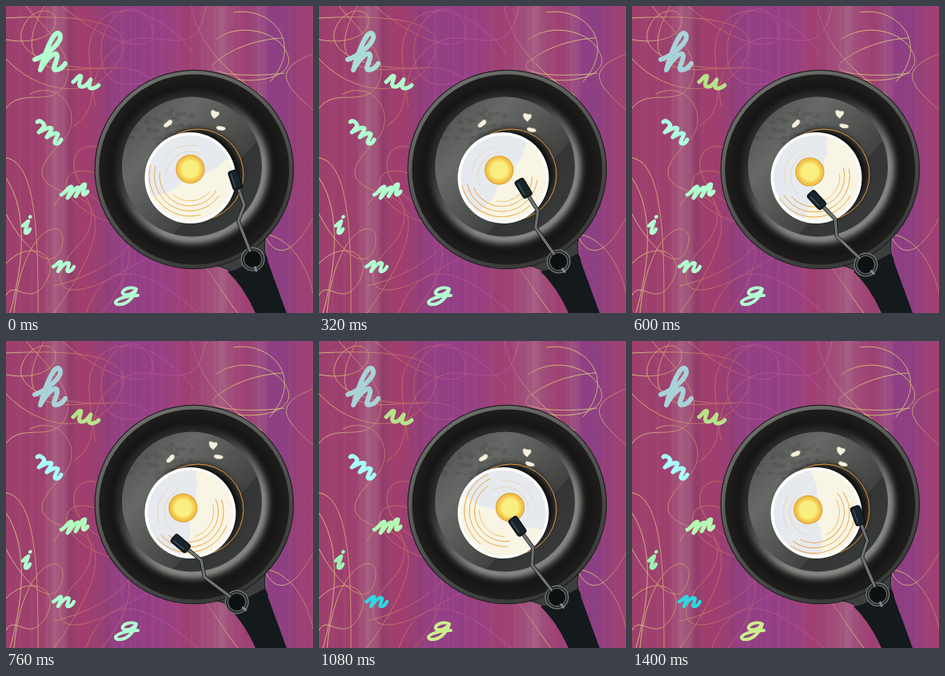
An HTML page that plays this animation: 384 by 384 pixels, repeating every 1.44 s.

```html
<!DOCTYPE html>
<html lang="en">
<head>
<meta charset="utf-8">
<title>Humming pan</title>
<style>
  html, body { margin: 0; height: 100%; overflow: hidden; background: #98407a; }
  svg { display: block; width: 100vw; height: 100vh; }
  filter { color-interpolation-filters: sRGB; }
  .line { fill: none; stroke-linecap: round; stroke-linejoin: round; }
</style>
</head>
<body>
<svg viewBox="0 0 384 384">
  <defs>
    <linearGradient id="wall">
      <stop offset="0" stop-color="#9f3f6d"/>
      <stop offset=".12" stop-color="#9e416f"/>
      <stop offset=".16" stop-color="#a65c80"/>
      <stop offset=".19" stop-color="#9f4f78"/>
      <stop offset=".21" stop-color="#933e6b"/>
      <stop offset=".25" stop-color="#a23e6d"/>
      <stop offset=".3" stop-color="#994074"/>
      <stop offset=".35" stop-color="#934081"/>
      <stop offset=".44" stop-color="#954087"/>
      <stop offset=".52" stop-color="#984082"/>
      <stop offset=".59" stop-color="#a04074"/>
      <stop offset=".65" stop-color="#a04a78"/>
      <stop offset=".7" stop-color="#a55c82"/>
      <stop offset=".74" stop-color="#a04a78"/>
      <stop offset=".78" stop-color="#9f4074"/>
      <stop offset=".83" stop-color="#9a4c80"/>
      <stop offset=".86" stop-color="#8f4085"/>
      <stop offset=".91" stop-color="#8e4083"/>
      <stop offset=".95" stop-color="#9a4078"/>
      <stop offset="1" stop-color="#a04072"/>
    </linearGradient>
    <linearGradient id="thread" gradientUnits="userSpaceOnUse" x2="384">
      <stop offset="0" stop-color="#e3e48a"/>
      <stop offset=".12" stop-color="#d9a370"/>
      <stop offset=".3" stop-color="#c96b63"/>
      <stop offset=".45" stop-color="#b850a0"/>
      <stop offset=".62" stop-color="#c257ac"/>
      <stop offset=".74" stop-color="#e4cf72"/>
      <stop offset=".88" stop-color="#e4e07c"/>
      <stop offset="1" stop-color="#c97868"/>
    </linearGradient>
    <linearGradient id="rim" x1=".25" y1="0" x2=".75" y2="1">
      <stop offset="0" stop-color="#70726e"/>
      <stop offset=".5" stop-color="#525451"/>
      <stop offset="1" stop-color="#343634"/>
    </linearGradient>
    <linearGradient id="floor" gradientUnits="userSpaceOnUse" x1="165" y1="140" x2="300" y2="262">
      <stop offset="0" stop-color="#555855"/>
      <stop offset=".22" stop-color="#666965"/>
      <stop offset=".4" stop-color="#595c59"/>
      <stop offset=".71" stop-color="#414341"/>
      <stop offset=".72" stop-color="#343635"/>
      <stop offset="1" stop-color="#383a39"/>
    </linearGradient>
    <linearGradient id="shine" x1=".2" y1=".1" x2=".8" y2=".9">
      <stop offset=".2" stop-color="#999" stop-opacity=".15"/>
      <stop offset=".75" stop-color="#aeb0ac"/>
    </linearGradient>
    <filter id="blur" x="-20%" y="-20%" width="140%" height="140%"><feGaussianBlur stdDeviation="4"/></filter>
    <clipPath id="floorClip"><circle cx="232.5" cy="201" r="87.5"/></clipPath>
    <clipPath id="eggClip"><circle cx="230.5" cy="215" r="53.5"/></clipPath>
  </defs>

  <rect width="384" height="384" fill="url(#wall)"/>
  <g id="stripes"/>
  <g class="line" stroke="url(#thread)" stroke-width=".9" opacity=".85">
    <path d="M0 42C30 48 60 40 62 20S30 0 20 30S60 80 130 78"/>
    <path d="M25 0C40 20 90 60 75 95S20 100 0 128"/>
    <path d="M48 0C30 30 20 70 60 78S160 60 190 100"/>
    <path d="M0 66C40 110 110 120 140 70S100 10 0 15"/>
    <path d="M0 190C40 195 40 300 40 384"/>
    <path d="M0 215C30 260 20 330 5 384"/>
    <path d="M0 260C20 300 60 340 70 300S20 270 10 384"/>
    <path d="M0 322C30 290 70 310 50 345S10 340 0 362"/>
    <path d="M30 110C70 90 100 140 70 170S30 220 80 235S120 300 60 384"/>
    <path d="M70 0C140 60 200 60 180 20S110 20 120 70S190 90 240 80"/>
    <path d="M112 125C100 90 130 40 170 40S240 60 250 0"/>
    <path d="M85 150C130 120 90 70 110 30S190 0 235 60"/>
    <path d="M232 0C240 50 280 85 320 112"/>
    <path d="M262 42C290 20 340 30 352 60S310 100 268 88"/>
    <path d="M285 8C330 0 375 45 330 95"/>
    <path d="M346 40C310 42 280 55 262 70S300 90 348 84"/>
    <path d="M384 130C350 100 330 80 384 60"/>
    <path d="M100 384C130 300 190 340 240 384"/>
    <path d="M60 250C90 200 130 260 90 300S60 384 150 330S240 320 290 384"/>
    <path d="M115 210C60 190 60 250 130 270S110 340 60 350"/>
    <path d="M125 180C80 160 70 210 110 240S180 310 120 384"/>
    <path d="M384 265C350 330 330 300 325 290S370 290 384 360"/>
  </g>
  <g id="letters" class="line"/>

  <path d="M258 324Q282 328 285 337L327 318Q321 306 325 288Z" fill="#3b3e3d" stroke="#191b1b"/>
  <path d="M277 332Q292 330 300 322L323 310Q327 312 328 321L351 384H312Q298 352 277 332Z" fill="#14191c"/>
  <circle cx="235.3" cy="204.500" r="124.2" fill="url(#rim)" stroke="#1d1f1e" stroke-width="1.2"/>
  <circle cx="235.3" cy="204.500" r="119" fill="#1f1e1d"/>
  <circle cx="235" cy="204" r="104" fill="none" stroke="#171615" stroke-width="14" filter="url(#blur)"/>
  <circle cx="233" cy="202" r="89" fill="none" stroke="url(#shine)" stroke-width="9" filter="url(#blur)"/>
  <circle cx="232.5" cy="201" r="87.5" fill="url(#floor)"/>
  <g id="grain" clip-path="url(#floorClip)" fill="#222" opacity=".13"/>

  <circle cx="238" cy="209" r="55" fill="#0b0c0b" filter="url(#blur)"/>
  <circle cx="240" cy="211" r="57" fill="none" stroke="#e9983a"/>
  <g id="butter" fill="#f5f0df" stroke="#d8cdb4" stroke-width=".6">
    <path d="M-6 3C-6-1-2-1 0-3S6-4 5-1S2 2 0 3S-4 5-6 3Z"/>
    <path d="M-5-4C-3-7 0-3 3-4S6 0 3 2S2 6-1 4S-5-1-5-4Z"/>
    <path d="M-6-1C-4-4-1-2 2-2S7 1 4 2S-5 3-6-1Z"/>
  </g>

  <g id="egg">
    <circle cx="230.5" cy="215" r="57" fill="#fff"/>
    <g clip-path="url(#eggClip)">
      <circle cx="230.5" cy="215" r="53.5" fill="#e6eaee"/>
      <path d="M170 243L188 237L203 233L213 227L222 219L234 217L246 213L256 206L264 203L272 194L290 186V280H170Z" fill="#f8f5e4"/>
    </g>
    <g id="grooves" class="line" stroke="#eba341" stroke-width=".9"/>
    <circle cx="230.5" cy="204" r="17.5" fill="#f3c34c" stroke="#dfa02c" stroke-width="1.2"/>
    <circle cx="230.5" cy="204" r="12.5" fill="#f9ef80" stroke="#f6da62" stroke-width="2.5"/>
  </g>

  <g id="arm">
    <circle cx="308.7" cy="316.8" r="12.500" fill="#15191b" stroke="#202424" stroke-width="4.500"/>
    <circle cx="308.7" cy="316.8" r="14.300" fill="none" stroke="#777a7a" stroke-width="1.3"/>
    <circle cx="308.7" cy="316.8" r="11.300" fill="#0e1112" stroke="#6a6e6e" stroke-width="1.2"/>
    <path class="line" d="M311.500 327L313 331" stroke="#868989" stroke-width="3"/>
    <g class="line">
      <path d="M305 306L290.500 269L298 249L291 229" stroke="#191d1f" stroke-width="4.800"/>
      <path d="M305 306L290.500 269L298 249L291 229" stroke="#8b8f90" stroke-width="2.800"/>
      <path d="M305 306L290.500 269L298 249L291 229" stroke="#323738" stroke-width=".6"/>
    </g>
    <g transform="rotate(-18 287 217.5)">
      <rect x="281" y="205.500" width="12" height="24" rx="3" fill="#18242b" stroke="#0d1316" stroke-width="1.500"/>
      <path d="M284 208.500V225.500" stroke="#3d5059" stroke-width="1.500"/>
    </g>
  </g>
</svg>
<script>
const LOOP = 1440, STEP = 40, TURN = 760;
const $ = id => document.getElementById(id);

function add(parent, name, attrs) {
  const node = document.createElementNS('http://www.w3.org/2000/svg', name);
  for (const key in attrs) node.setAttribute(key, attrs[key]);
  return parent.appendChild(node);
}

let seed = 7;
const random = () => (seed = seed * 16807 % 2147483647) / 2147483647;

for (let x = 0; x < 384; x += 1 + random() * 5) {
  add($('stripes'), 'rect', {
    x, width: 1 + random() * 3, height: 384,
    fill: random() < .5 ? '#fff' : '#402', opacity: random() * .03
  });
}
for (let i = 0; i < 60; i++) {
  add($('grain'), 'rect', {
    x: 150 + random() * 80, y: 125 + random() * 45,
    width: 2 + random() * 6, height: 2 + random() * 4
  });
}

// Grooves: radius, start and end angle in degrees, opacity
const grooves = [
  [51, 75, 195, 1], [44.5, 35, 195, 1], [38, 30, 185, 1],
  [32, 40, 130, .7], [38, 215, 285, .3], [30, 180, 300, .3]
];
for (const [r, from, to, opacity] of grooves) {
  const point = a => {
    const rad = a * Math.PI / 180;
    return `${230 + r * Math.cos(rad)} ${212 + r * Math.sin(rad)}`;
  };
  add($('grooves'), 'path', { d: `M${point(from)}A${r} ${r} 0 0 1 ${point(to)}`, opacity });
}

const MINT = '#b1ffd0';
const letters = [
  { start: 200, color: '#a9d2d8', width: 6, d: 'M36 67C48 63 73 45 67 35C62 28 51 50 43 80C50 66 62 55 64 62C65 68 56 80 62 80C67 80 72 76 74 72' },
  { start: 310, color: '#b7e388', width: 5, d: 'M84 95C88 92 92 85 94 88C93 94 89 99 94 101C99 102 103 96 106 92C104 97 102 103 107 103C111 103 114 101 116 99' },
  { start: 540, color: '#a9fffb', width: 5, d: 'M39 145C42 142 47 146 48 149C46 154 43 156 41 158C46 156 53 150 57 153C56 158 52 162 51 164C56 161 62 157 65 160C64 165 59 170 62 172C65 173 68 170 69 167' },
  { start: 680, color: '#b4f9b4', width: 4.8, d: 'M69 236C73 236 78 225 82 226C82 232 78 236 77 240C82 235 86 226 91 227C91 232 88 235 87 238C91 233 95 222 99 223C99 229 94 234 97 236C100 236 101 234 102 232' },
  { start: 800, color: '#9cf3b2', width: 4.4, d: 'M21 275C24 272 27 269 28 269C26 276 22 284 25 284C28 284 29 281 30 279M30 264L30.500 263.500' },
  { start: 880, color: '#2fd7e2', width: 4.4, d: 'M59 326C63 325 67 318 69 320C69 325 66 329 65 332C69 326 76 319 79 322C79 326 74 332 78 332C82 332 84 328 85 326' },
  { start: 920, color: '#cbee8c', width: 4, d: 'M163 354C155 349 140 357 148 361C156 363 162 356 163 354C160 365 150 375 139 373C131 369 148 362 165 362' }
];
for (const letter of letters) {
  letter.path = add($('letters'), 'path', { d: letter.d, 'stroke-width': letter.width });
}

// Butter poses: time, then x, y and tilt
const butter = [
  [[0, 203, 147, -8], [760, 206, 147, -16], [1080, 206, 146, -4], [1240, 205, 145, 6], [1400, 205, 141, 6], [1440, 203, 147, -8]],
  [[0, 261, 136, 10], [160, 261, 140, 0], [480, 260, 139, 0], [760, 259, 131, 0], [1080, 260, 140, 0], [1240, 261, 142, 0], [1440, 261, 137, 10]],
  [[0, 269, 153, 0], [160, 267, 156, 0], [480, 265, 154, 8], [760, 266, 145, 0], [1080, 264, 154, 10], [1240, 264, 157, 10], [1400, 264, 154, 10], [1440, 269, 153, 0]]
];

function poseAt(keys, t) {
  const i = keys.findIndex(key => key[0] > t);
  const a = keys[i - 1], b = keys[i], k = (t - a[0]) / (b[0] - a[0]);
  return a.map((v, j) => v + (b[j] - v) * k);
}

function eggAngle(t) {
  if (t <= TURN) return -.1 * t + .000036 * t * t;
  const u = t - TURN;
  return -55 + .124 * u + .00065 * u * u;
}

function armAngle(t) {
  return -31.5 * (t <= TURN ? t / TURN : (LOOP - t) / (LOOP - TURN));
}

function draw(now) {
  const t = Math.floor(now % LOOP / STEP) * STEP;
  $('egg').setAttribute('transform', `rotate(${eggAngle(t)} 230.5 215)`);
  $('arm').setAttribute('transform', `rotate(${armAngle(t)} 316 357)`);
  butter.forEach((keys, i) => {
    const [, x, y, tilt] = poseAt(keys, t);
    $('butter').children[i].setAttribute('transform', `translate(${x} ${y}) rotate(${tilt})`);
  });
  for (const { path, start, color } of letters) {
    const mix = Math.min(1, Math.max(0, (t - start) / 160));
    path.style.stroke = `color-mix(in srgb, ${color} ${mix * 100}%, ${MINT})`;
  }
}

const begin = performance.now();
function tick() {
  draw(performance.now() - begin);
  requestAnimationFrame(tick);
}
tick();
</script>
</body>
</html>
```
